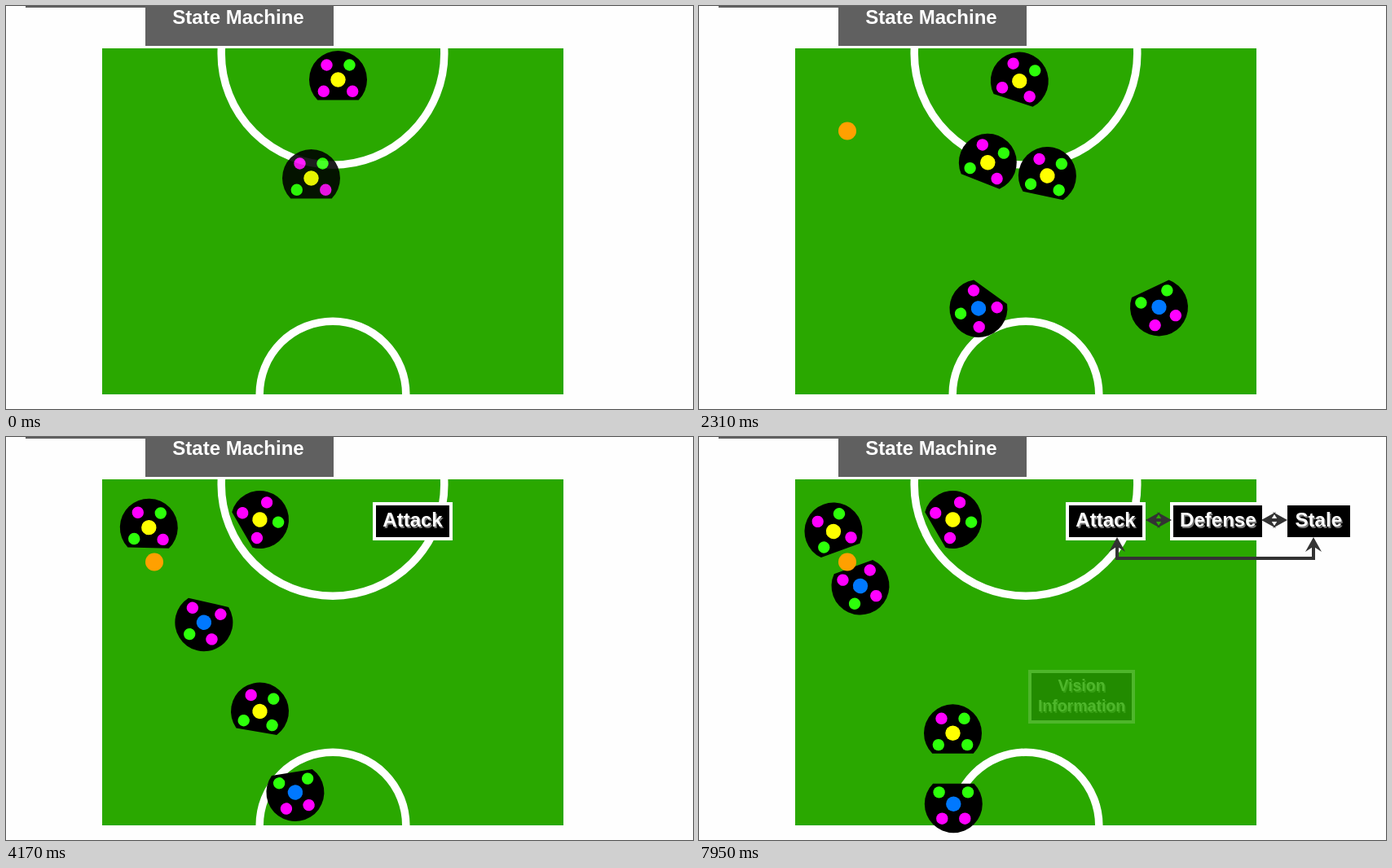
An HTML page that plays this animation: 843x495 px, repeating every 8 s.

```html
<!DOCTYPE html>
<html>
<head>
<meta charset="utf-8">
<title>State Machine</title>
<style>
  html, body { margin: 0; width: 100%; height: 100%; overflow: hidden; background: #fefefe; }
  svg { display: block; width: 843px; height: 495px; }
  text { font: bold 24px "Liberation Sans", Arial, sans-serif; text-anchor: middle; fill: #fff; }
</style>
</head>
<body>
<svg id="stage" viewBox="0 0 843 495">
  <defs><clipPath id="pitch"><rect x="118" y="52" width="566" height="425"/></clipPath></defs>
  <rect x="24" width="147" height="2" fill="#606060"/>
  <rect x="171" width="231" height="49" fill="#606060"/>
  <text x="285" y="22">State Machine</text>
  <rect x="118" y="52" width="566" height="425" fill="#2aa800"/>
  <g clip-path="url(#pitch)" fill="none" stroke="#fff" stroke-width="9.5">
    <circle cx="401" cy="58.5" r="136.8"/>
    <circle cx="401" cy="477" r="89.8"/>
  </g>
</svg>
<script>
const LOOP = 8000, FADE = 430;
const MAGENTA = '#f0f', GREEN = '#2dff0a', YELLOW = '#ff0', BLUE = '#0078ff', DARK = '#333';
const stage = document.getElementById('stage');

function add(parent, tag, attrs, content) {
  const el = document.createElementNS('http://www.w3.org/2000/svg', tag);
  for (const k in attrs) el.setAttribute(k, attrs[k]);
  if (content) el.textContent = content;
  parent.appendChild(el);
  return el;
}

const clamp = v => Math.max(0, Math.min(1, v));
const ease = u => u < 0.5 ? 2 * u * u : 1 - 2 * (1 - u) * (1 - u);
const mix = (a, b, u) => a + (b - a) * u;

// Playback advances in 120 ms steps, apart from these longer holds.
const longHolds = new Set([360, 510, 1500, 1770, 2160, 2310, 2460, 2610, 3360, 3750, 3900,
  4170, 4560, 5550, 6180, 6450, 6600, 6750, 7140, 7410, 7680]);
function snap(time) {
  let t = 0;
  for (;;) {
    const next = t + (longHolds.has(t) ? 150 : 120);
    if (next > time) return t;
    t = next;
  }
}

const faders = [];
function fader(start, parent = stage) {
  const el = add(parent, 'g', {});
  faders.push({ el, start });
  return el;
}

// Moves are [start, duration]; poses are [x, y, angle].
const FIRST = [2083, 835], DASH = [2030, 463], SECOND = [3520, 885], THIRD = [5018, 845];
const SPIN_LEAD = 25;
const robots = [
  { fade: -FADE, hub: YELLOW, dots: 'mgmm', from: [407.5, 90.5, 0],
    moves: [[FIRST, [311.5, 101.5, 60]]] },
  { fade: -380, hub: YELLOW, dots: 'mggm', from: [374.5, 211.5, 0],
    moves: [[FIRST, [238, 81.5, 71]], [SECOND, [165, 116, -20]]] },
  { fade: 103, hub: YELLOW, dots: 'mggg', from: [447.5, 214.5, 0],
    moves: [[FIRST, [311.5, 174, 40.4]], [SECOND, [311.5, 363.8, 0]]] },
  { fade: 586, hub: BLUE, dots: 'mgmm', from: [376.5, 412.5, 180],
    moves: [[FIRST, [149.5, 134.6, 299]], [SECOND, [258.2, 243, 160]], [THIRD, [198, 183, 160]]] },
  { fade: 1069, hub: BLUE, dots: 'mmgg', from: [454.5, 412.5, 180],
    moves: [[DASH, [614.5, 350.5, 141.5]], [SECOND, [312.3, 450.7, 180]]] }
];
const spots = [[-14, -18], [14, -18], [-17.7, 14.3], [17.7, 14.3]];

for (const r of robots) {
  r.el = add(fader(r.fade), 'g', {});
  add(r.el, 'path', { d: 'M-25.2 25A35.5 35.5 0 1 1 25.2 25Z' });
  spots.forEach(([cx, cy], i) =>
    add(r.el, 'circle', { cx, cy, r: 7.2, fill: r.dots[i] === 'm' ? MAGENTA : GREEN }));
  add(r.el, 'circle', { r: 9.2, fill: r.hub });
}

function pose(robot, t) {
  let [x, y, angle] = robot.from;
  for (const [[start, length], to] of robot.moves) {
    const u = ease(clamp((t - start) / length));
    x = mix(x, to[0], u);
    y = mix(y, to[1], u);
    angle = mix(angle, to[2], clamp((t - start + SPIN_LEAD) / length));
  }
  return `translate(${x} ${y}) rotate(${angle})`;
}

add(fader(1552), 'circle', { cx: 182, cy: 153.5, r: 11, fill: '#ffa000' });

function label(start, x, y, width, height, lines, size = 24) {
  const g = fader(start);
  add(g, 'rect', { x: x - 2, y: y - 2, width: width + 4, height: height + 4,
    stroke: '#fff', 'stroke-width': 4 });
  lines.forEach(([str, cx, base]) => {
    const style = `font-size:${size}px`;
    add(g, 'text', { x: cx + 1.5, y: base + 1.5, style: style + ';fill:#777' }, str);
    add(g, 'text', { x: cx, y: base, style }, str);
  });
}
label(2930, 454, 84, 90, 39, [['Attack', 499, 110]]);
label(4410, 582, 84, 109, 39, [['Defense', 636.8, 110]]);
label(5952, 722, 84, 77, 39, [['Stale', 760.3, 110]]);

function head(parent, x, y, angle) {
  add(parent, 'path', { d: 'M0 0L10 18L0 11.5L-10 18Z', fill: DARK,
    transform: `translate(${x} ${y}) rotate(${angle})` });
}
function line(parent, d) {
  add(parent, 'path', { d, fill: 'none', stroke: DARK, 'stroke-width': 4 });
}
function link(start, x1, x2) {
  const g = fader(start);
  line(g, `M${x1 + 6} 102H${x2 - 6}`);
  head(g, x1, 102, -90);
  head(g, x2, 102, 90);
}
link(6455, 690, 722);
link(6940, 548, 580);

const bridge = fader(7395);
line(bridge, 'M513 129V149H754V129');
head(bridge, 513, 123, 0);
head(bridge, 754, 123, 0);

label(7877, 408, 290, 123, 58, [['Vision', 469.5, 312], ['Information', 469.5, 337]], 19.5);

function render(t) {
  for (const f of faders) f.el.setAttribute('opacity', clamp((t - f.start) / FADE));
  for (const r of robots) r.el.setAttribute('transform', pose(r, t));
}
function tick() {
  render(snap(performance.now() % LOOP));
  requestAnimationFrame(tick);
}
tick();
</script>
</body>
</html>
```
